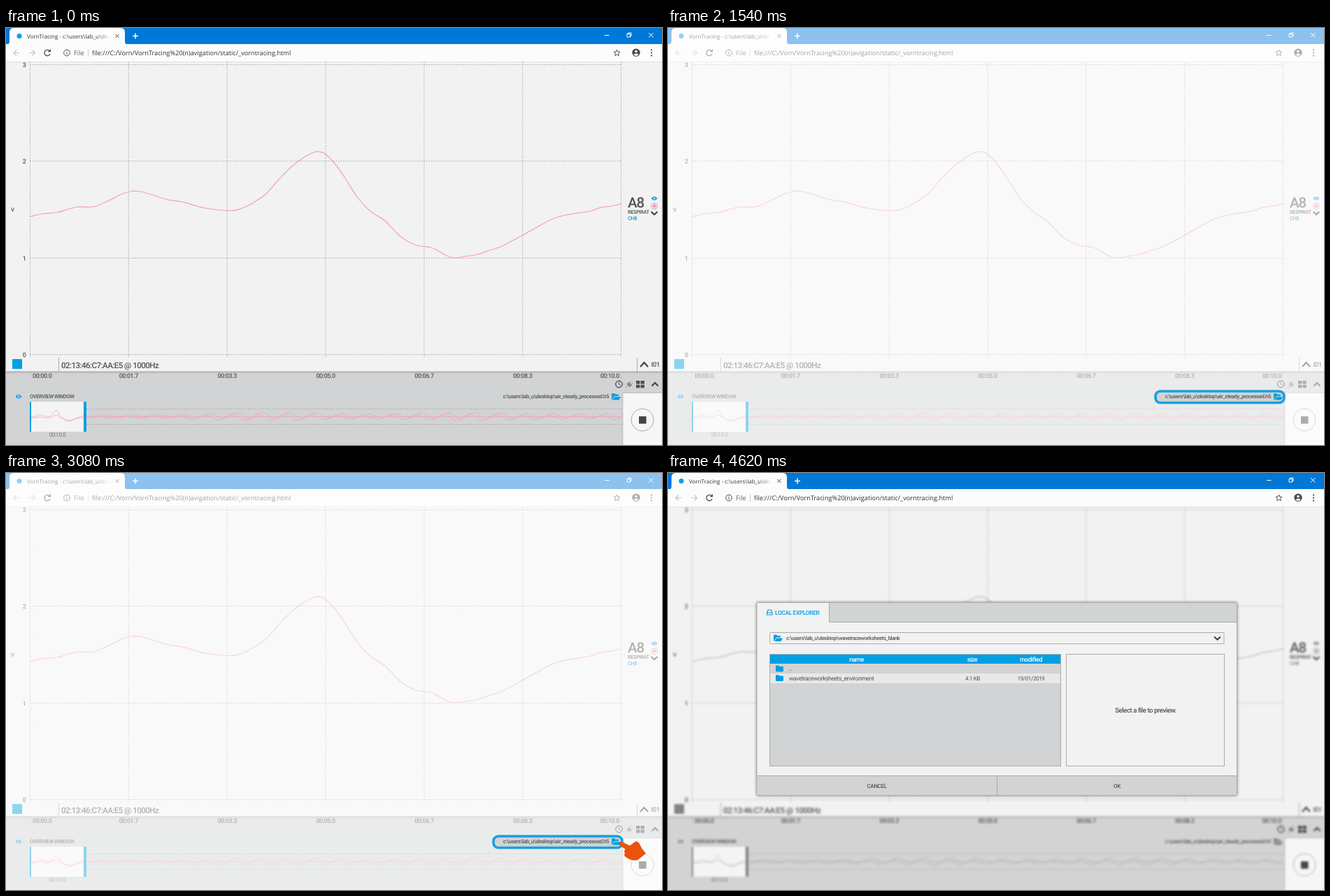
An HTML page that plays this animation: 938x597 px, repeating every 8000 ms.

```html
<!DOCTYPE html>
<html lang="en">
<head>
<meta charset="utf-8">
<title>Signal viewer</title>
<style>
  html, body { margin: 0; height: 100%; overflow: hidden; background: #f2f2f2; }
  svg { display: block; width: 100vw; height: 100vh; text-rendering: geometricPrecision; }
  text { fill: #555; font: 500 9px Roboto, sans-serif; letter-spacing: -.05em; }
  .chrome text { font-family: "Open Sans", "Noto Sans", sans-serif; font-weight: 400; letter-spacing: 0; fill: #333; }
  .mid { text-anchor: middle; }
  .end { text-anchor: end; }
  .path { font-size: 7.7px; }
  .small { font-size: 8.1px; }
  .row text { font-weight: 400; }
  .head text { fill: #fff; }
  .line { fill: none; stroke: #4d4d4d; }
  .chevron { fill: none; stroke: #444; stroke-width: 2.2; }
  .blue { fill: #00a0e3; }
  .grey { fill: #d1d3d4; }
  .grid { fill: none; stroke: #a2a2a2; stroke-width: .9; stroke-dasharray: 1.7 1.8; }
  .trace { fill: none; stroke: #f3a1b7; }
  .rule { fill: none; stroke: #a9abac; }
  #blurred { filter: blur(1.4px) grayscale(1); }
  #dialogBox { filter: drop-shadow(0 0 2px rgba(0, 0, 0, .6)); }
</style>
</head>
<body>
<svg viewBox="0 0 938 597" preserveAspectRatio="none">
  <defs>
    <linearGradient id="tabFade">
      <stop offset="0" stop-color="#fff" stop-opacity="0"/>
      <stop offset="1" stop-color="#fff"/>
    </linearGradient>
    <linearGradient id="edge" x2="0" y2="1">
      <stop offset="0" stop-color="#a6a8a9"/>
      <stop offset="1" stop-color="#d1d3d4"/>
    </linearGradient>
    <clipPath id="tabText"><rect x="28" y="3" width="120" height="18"/></clipPath>
    <path id="openFolder" class="blue" d="M0 9V1q0-1 1-1h3l1.5 1.5H9q1 0 1 1V4H4L1 9zM1.5 9.5 4.3 5H13l-2.6 4.5z"/>
    <path id="folder" class="blue" d="M0 1q0-1 1-1h3l1.5 1.5H10q1 0 1 1V8q0 1-1 1H1Q0 9 0 8z"/>
    <g id="eye">
      <path class="blue" d="M-4.5 0Q0-5.5 4.5 0 0 5.5-4.5 0z"/>
      <circle r="1.5" fill="#f2f2f2"/><circle r=".8" class="blue"/>
    </g>
    <g id="fileLabel">
      <text class="path end" x="862" y="530.3">c:\users\lab_u\desktop\air_steady_processed.h5</text>
      <use href="#openFolder" x="866" y="523"/>
    </g>
  </defs>

  <g id="page">
    <rect x="-10" y="40" width="958" height="460" fill="#f2f2f2"/>
    <path id="grid" class="grid"/>
    <g id="chartLabels"></g>
    <text class="mid" x="9.5" y="263" style="font-size:8px">V</text>
    <path id="signal" class="trace" stroke-width="1.2"/>

    <text x="889" y="257" style="font-size:20.5px">A8</text>
    <text x="889" y="266" style="font-size:7.4px">RESPIRAT</text>
    <text x="889" y="275" style="font-size:7.4px;fill:#00a0e3">CH8</text>
    <use href="#eye" x="927" y="244"/>
    <circle cx="927" cy="255" r="4.2" class="trace" stroke-width="1.2"/>
    <circle cx="927" cy="255" r="2.3" fill="#ee8fa9"/>
    <path class="chevron" d="M922.5 263l4.5 4 4.5-4"/>

    <rect x="9" y="474" width="14" height="14" class="blue"/>
    <path class="rule" d="M75.5 472v20M902.5 472v20"/>
    <text x="79" y="487" style="font-size:11.6px">02:13:46:C7:AA:E5 @ 1000Hz</text>
    <path class="chevron" d="M907 485l5.5-6 5.5 6"/>
    <text x="922.5" y="485" style="font-size:9.5px">I01</text>

    <rect x="-10" y="492" width="958" height="115" class="grey"/>
    <rect x="-10" y="491.5" width="958" height="3.5" fill="url(#edge)"/>
    <g id="timeLabels"></g>
    <path class="grid" d="M34.5 494v8M879.5 494v8"/>
    <circle cx="876.5" cy="510" r="4.7" class="line" stroke-width="1.4"/>
    <path class="line" d="M876.5 507v3.3l2 1"/>
    <path d="M886 515l2.5-2.5M888 510l3 3.5 3.5-2-4-4.5zM891.5 508l2-2.5M894 510.5l2-2.5" fill="#858789" stroke="#858789"/>
    <path d="M901 505h5.3v4.5H901zM907.5 505h5.3v4.5h-5.3zM901 510.7h5.3v4.5H901zM907.5 510.7h5.3v4.5h-5.3z" fill="#4d4d4d"/>
    <path class="chevron" d="M923.5 512.5l4.5-4.5 4.5 4.5"/>

    <use href="#eye" x="18" y="527.5"/>
    <text x="34" y="530.4" style="font-size:7.5px">OVERVIEW WINDOW</text>
    <use href="#fileLabel"/>
    <path class="grid" d="M115 545.5H881M115 567.5H881"/>
    <rect x="35" y="535" width="77" height="43" fill="#f4f4f4"/>
    <g id="overview"></g>
    <rect x="34" y="535" width="2" height="43" class="blue"/>
    <rect x="111" y="535" width="4" height="43" class="blue"/>
    <text class="mid" x="73.5" y="585" style="font-size:8px;font-weight:400;fill:#777">00:10.0</text>

    <path fill="#c3c5c6" d="M880.5 523H948v-1.5H880.5zM880.5 523h2v84h-2z"/>
    <rect x="882.5" y="523" width="66" height="84" fill="#f6f6f6"/>
    <circle cx="910" cy="561" r="16" class="rule"/>
    <rect x="905" y="556" width="10.5" height="10.5" fill="#444"/>
  </g>

  <g id="browser" class="chrome">
    <rect width="938" height="24" fill="#0078d7"/>
    <rect y="23" width="938" height="25.5" fill="#fcfcfc"/>
    <path d="M0 48.5H938" stroke="#e2e2e2"/>
    <path d="M0 24q5 0 5-5V6q0-6 6-6H164q6 0 6 6V19q0 5 5 5z" fill="#fcfcfc"/>
    <circle cx="19" cy="11.5" r="3.5" class="blue"/>
    <text x="30" y="14.5" style="font-size:8px" clip-path="url(#tabText)">VornTracing - c:\users\lab_u\desktop</text>
    <rect x="130" y="4" width="19" height="16" fill="url(#tabFade)"/>
    <path class="line" d="M156.5 9l5 5m0-5l-5 5"/>
    <path d="M181 11.5h8m-4-4v8" stroke="#fff" stroke-width="1.5"/>
    <path d="M856 10.5h6.5M888 8.5h4.5v4.5H888zM889.5 8.5V7h4.5v4.5h-1.5M919 7l6.5 6.5m0-6.5l-6.5 6.5" fill="none" stroke="#fff"/>
    <path d="M19.5 35.5H11m4-4l-4 4 4 4M33 35.5h8.5m-4-4l4 4-4 4" fill="none" stroke="#c4c4c4" stroke-width="1.2"/>
    <path class="line" stroke-width="1.3" d="M62.5 33a4.2 4.2 0 1 0 .6 4M63.4 30.5v3.2h-3.2"/>
    <circle cx="87" cy="35.5" r="4.4" class="line"/>
    <path class="line" d="M87 34.8v3M87 32.7v1.1"/>
    <text x="97" y="38.7" style="font-size:9.4px;fill:#666">File</text>
    <path d="M117.5 30v11" stroke="#ccc"/>
    <text x="123" y="38.7" style="font-size:9.2px">file:///C:/Vorn/VornTracing%20(n)avigation/static/_vorntracing.html</text>
    <path class="line" d="M873.5 31l1.3 3 3.2.3-2.4 2.1.7 3.2-2.8-1.7-2.8 1.7.7-3.2-2.4-2.1 3.2-.3z"/>
    <circle cx="901" cy="35.3" r="5.7" fill="#4d4d4d"/>
    <circle cx="901" cy="33.5" r="1.8" fill="#fcfcfc"/>
    <path d="M897.3 38.3q3.7-3.4 7.4 0-3.7 3.2-7.4 0z" fill="#fcfcfc"/>
    <path d="M923 30.5v2m0 2v2m0 2v2" stroke="#444" stroke-width="1.8"/>
  </g>

  <g id="highlight">
    <rect width="938" height="597" fill="#fff" opacity=".55"/>
    <rect x="697" y="520" width="184" height="16.5" rx="7" class="grey" style="stroke:#18a0e0;stroke-width:3.6"/>
    <use href="#fileLabel"/>
  </g>

  <path id="hand" fill="#e9530e" d="M876.5 530.5q1.5-4 5.5-2l10 5 6-4.5q4-3 7 .5l4.5 8.5 5.5 6.5-11.5 9.5q-9 2-17-4-4-2.5-1.5-5.5-2-3 .5-6l-7.5-5q-2-1-1.5-3z"/>

  <g id="dialog">
    <rect width="938" height="597" fill="#f2f2f2"/>
    <g id="blurred"><use href="#page"/></g>
    <use href="#browser"/>
    <rect id="dialogBox" x="127" y="185.5" width="686.5" height="276" rx="1" fill="#f2f2f2"/>
    <path class="grey" d="M231 186H813v27.5H231zM127.5 434H813v27.5H127.5z"/>
    <path class="rule" d="M230.5 186v27.5H813M127 433.5H813M470.5 434v27.5"/>
    <rect class="rule" x="127" y="185.5" width="686.5" height="276" rx="1"/>
    <path d="M141.5 200l1.5-4h4.5l1.5 4v3h-7.5zh7.5" fill="none" stroke="#00a0e3" stroke-width="1.2"/>
    <text x="153" y="202.6" style="font-size:8.5px;fill:#00a0e3">LOCAL EXPLORER</text>

    <rect class="rule" x="145.5" y="228.5" width="649.5" height="16" rx="1"/>
    <use href="#openFolder" x="151" y="231.5"/>
    <text class="path" x="169" y="239.3">c:\users\lab_u\desktop\wavetraceworksheets_blank</text>
    <path class="chevron" d="M781 234.5l4.5 4 4.5-4"/>

    <rect class="grey" x="145" y="259" width="417" height="161"/>
    <rect x="145" y="287" width="417" height="14" fill="#e7e8e8"/>
    <rect x="145.5" y="259.5" width="416" height="13.5" class="blue"/>
    <rect class="rule" x="145.5" y="259.5" width="416" height="160"/>
    <g class="head mid">
      <text x="269.5" y="269.5">name</text>
      <text x="435" y="269.5">size</text>
      <text x="519" y="269.5">modified</text>
    </g>
    <use href="#folder" x="154" y="275.5"/>
    <use href="#folder" x="154" y="289"/>
    <g class="row">
      <text x="173" y="283">..</text>
      <text x="173" y="297" style="font-size:8.6px">wavetraceworksheets_environment</text>
      <text class="mid small" x="435.5" y="297">4.1 KB</text>
      <text class="mid small" x="519" y="297">19/01/2019</text>
    </g>

    <rect class="rule" x="569.5" y="259.5" width="226" height="160"/>
    <text class="mid" x="683" y="342.7" style="font-size:9.7px">Select a file to preview.</text>
    <text class="mid small" x="298.5" y="451">CANCEL</text>
    <text class="mid small" x="642" y="451">OK</text>
  </g>
</svg>
<script>
const byId = id => document.getElementById(id);
const gridX = Array.from({length: 7}, (_, i) => 34.5 + i * 140.85);
const gridY = [52.5, 190.5, 329.5, 467.5];

byId('grid').setAttribute('d',
  gridX.map(x => `M${x} 49V471`).join('') + gridY.map(y => `M34 ${y}H880`).join(''));
byId('chartLabels').innerHTML = gridY.map((y, i) =>
  `<text class="end" x="28.5" y="${y + 3}">${3 - i}</text>`).join('');
byId('timeLabels').innerHTML = gridX.map((x, i) => {
  const anchor = i === 0 ? 'start' : i === 6 ? 'end' : 'middle';
  const labelX = i === 0 ? 38 : i === 6 ? 877 : x;
  const seconds = (i * 10 / 6).toFixed(1).padStart(4, '0');
  return `<text x="${labelX}" y="501.3" text-anchor="${anchor}">00:${seconds}</text>`;
}).join('');

// Catmull-Rom spline through the given points.
function smoothPath(points) {
  const at = i => points[Math.max(0, Math.min(points.length - 1, i))];
  let d = `M${points[0]}`;
  for (let i = 0; i < points.length - 1; i++) {
    const [a, b, c, e] = [at(i - 1), at(i), at(i + 1), at(i + 2)];
    d += `C${b.map((v, k) => v + (c[k] - a[k]) / 6)} ${c.map((v, k) => v - (e[k] - b[k]) / 6)} ${c}`;
  }
  return d;
}

const breath = [
  [35, 270], [52, 266], [73, 264], [90, 259], [105, 256], [125, 256], [145, 248], [165, 238],
  [178, 234], [192, 234], [210, 239], [232, 246], [252, 249], [285, 258], [320, 261.5], [335, 259],
  [352, 251], [371, 238], [390, 217], [410, 197], [428, 184], [440, 178], [447, 177], [456, 180],
  [470, 194], [485, 215], [503, 243], [522, 263], [542, 276], [560, 295], [575, 306], [590, 312],
  [607, 314], [618, 319], [630, 326], [641, 329], [657, 327], [675, 324], [692, 318], [710, 312],
  [738, 297], [780, 274], [800, 268], [836, 262], [850, 257], [865, 255], [880, 251.5]
];
byId('signal').setAttribute('d', smoothPath(breath));

// Two braided strands whose swing grows after the first quarter.
function overviewStrand(level, shift) {
  const points = [];
  for (let x = 115; x <= 880; x += 4) {
    const swell = x < 260 ? 1.2 : 3.4 + Math.sin(x / 47);
    points.push([x, level - swell * Math.cos((x - 291) * 2 * Math.PI / 37.8 + shift)]);
  }
  return smoothPath(points);
}
const miniBreath = (scale, top) =>
  smoothPath(breath.map(([x, y]) => [35 + (x - 35) * .09, top + (y - 177) * scale]));
byId('overview').innerHTML =
  [overviewStrand(555, 0), overviewStrand(557.5, .9), 'M115 556.5H881', miniBreath(.1, 548), miniBreath(.05, 554)]
    .map(d => `<path class="trace" stroke-width=".9" opacity=".85" d="${d}"/>`).join('');

const LOOP = 8000, STEP = 60, STEPS = 10;
const fades = [['highlight', 1000], ['hand', 2540], ['dialog', 4080]]
  .map(([id, start]) => ({element: byId(id), start}));

function draw(now) {
  const time = now % LOOP;
  for (const {element, start} of fades) {
    const step = Math.floor((time - start) / STEP) + 1;
    element.setAttribute('opacity', Math.max(0, Math.min(STEPS, step)) / STEPS);
  }
  requestAnimationFrame(draw);
}
draw(0);
</script>
</body>
</html>
```
